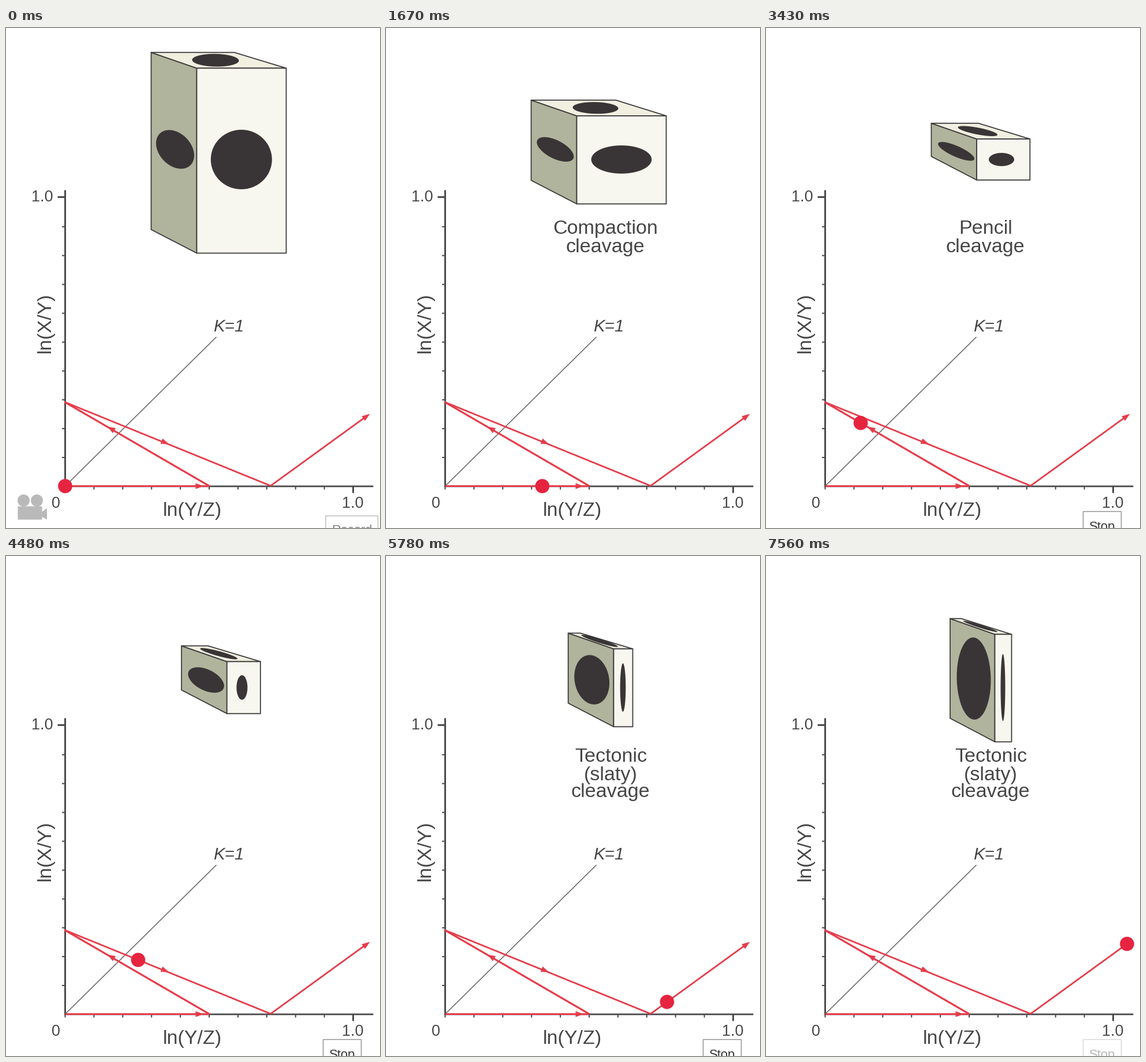
A matplotlib script for the animation above (7620 ms loop, 648 by 865 pixels).

```python
import numpy as np
import matplotlib.pyplot as plt
from matplotlib.animation import FuncAnimation
from matplotlib.collections import LineCollection
from matplotlib.patches import Circle, Polygon, Rectangle

W, H, DPI = 648, 865, 100
LOOP, STEP = 7620, 30
PT = 72 / DPI  # points per pixel

INK, TEXT, DARK = "#4a4a4c", "#464547", "#393536"
RED, DOT = "#e63c4a", "#e6243f"
FRONT, SIDE, TOP = "#f7f7ef", "#b1b49c", "#f0efe0"

plt.rcParams["font.family"] = "Liberation Sans"
plt.rcParams["path.snap"] = False
fig = plt.figure(figsize=(W / DPI, H / DPI), dpi=DPI, facecolor="white")
ax = fig.add_axes([0, 0, 1, 1])
# Whole coordinates are pixel centres
ax.set_xlim(-0.5, W - 0.5)
ax.set_ylim(H - 0.5, -0.5)
ax.axis("off")


def text(x, y, s, size, color=TEXT, **kw):
    opts = dict(ha="center", va="baseline", zorder=3)
    opts.update(kw)
    return ax.text(x, y, s, fontsize=size * PT, color=color, **opts)


def line(p, q, color, width, z):
    ax.plot(*zip(p, q), color=color, lw=width * PT, zorder=z,
            solid_capstyle="butt")


def arrow_head(tip, start, end, length=14, half=5):
    d = np.subtract(end, start) / np.hypot(*np.subtract(end, start))
    n = np.array([-d[1], d[0]])
    base = np.array(tip) - length * d
    ax.add_patch(Polygon([tip, base + half * n, base - half * n],
                         fc=RED, ec="none", zorder=5))


def shape(color, edge="none"):
    patch = Polygon(np.zeros((3, 2)), fc=color, ec=edge, lw=1.8 * PT,
                    joinstyle="round", zorder=2)
    return ax.add_patch(patch)


# Chart
ORIGIN_X, ORIGIN_Y, UNIT = 102, 792.4, 499
line((ORIGIN_X, 280), (ORIGIN_X, 794), INK, 3, 1)
line((101, ORIGIN_Y), (636, ORIGIN_Y), INK, 2.8, 1)
minor = [[(ORIGIN_X, 792), (ORIGIN_X, 798)]]
for i in range(1, 10):
    x, y = ORIGIN_X + UNIT * i / 10, ORIGIN_Y - UNIT * i / 10
    minor += [[(x, 792), (x, 798)], [(96.5, y), (102, y)]]
ax.add_collection(LineCollection(minor, colors=INK, linewidths=2 * PT, zorder=1))
line((89, 292), (102, 292), INK, 3, 1)
line((601, 792), (601, 804), INK, 3, 1)
line((102, 792), (364, 534), "#6a6a6c", 1.6, 1)

text(62, 300, "1.0", 27)
text(600.5, 830, "1.0", 27)
text(86, 830, "0", 27)
text(322.5, 844, "ln(Y/Z)", 34)
text(67.5, 510, "ln(X/Y)", 34, rotation=90, va="center")
text(385, 525, "K=1", 29.5, style="italic")

# Strain path
PATH = np.array([(102, 792), (352, 792), (101, 646.5), (458, 791.5), (625, 670.5)])
for a, b, tip, width in zip(PATH, PATH[1:],
                            [(342, 792), (175, 689), (282, 719.5), (630, 667)],
                            [3, 3.2, 2.8, 2.8]):
    line(a, b, RED, width, 4)
    arrow_head(tip, a, b)
dot = ax.add_patch(Circle(PATH[0], 12.3, fc=DOT, ec="none", zorder=6))

# Block geometry at each corner of the strain path
KEYS = {
    "left": (330, 330, 376, 393.5, 396),
    "right": (485, 485, 447.5, 427.4, 425),
    "top": (69, 191.5, 191.5, 165.3, 135),
    "bottom": (389, 262.5, 262.5, 289.5, 321),
    "back_left": (251, 251, 297.5, 314.5, 318.5),
    "back_right": (395, 399, 357, 336, 338),
    "front_x": (407.3, 407.5, 407.5, 410, 410),
    "front_rx": (53, 52, 12, 5, 4),
    "front_ry": (51.5, 11.2, 11.5, 38.6, 58),
    "top_x": (362.5, 362.5, 367.5, 369.5, 371),
    "top_a": (40.5, 39, 33.5, 33.5, 31),
    "top_b": (11, 9.7, 4.6, 3.6, 2.6),
    "top_tilt": (1, 1.5, 14, 17.5, 17.5),
    "side_x": (292.5, 293, 341, 355.5, 359.5),
    "side_y": (209.5, 209.5, 214, 214, 211.5),
    "side_rx": (33, 31.5, 31.5, 30.6, 29.5),
    "side_ry": (31.8, 10.2, 10, 36.5, 71),
    "side_shear": (0.32, 0.42, 0.4, 0.2, 0.1),
}
EDGE = "#3c3b3c"
side_face, top_face, front_face = (shape(c, EDGE) for c in (SIDE, TOP, FRONT))
side_spot, top_spot, front_spot = (shape(DARK) for _ in range(3))
ANGLE = np.linspace(0, 2 * np.pi, 90)
COS, SIN = np.cos(ANGLE), np.sin(ANGLE)


def draw_block(progress):
    g = {k: np.interp(progress, range(5), v) for k, v in KEYS.items()}
    l, r, t, b = g["left"], g["right"], g["top"], g["bottom"]
    bl, br, bt, bb = g["back_left"], g["back_right"], t - 27.2, b - 40.8
    side_face.set_xy([(bl, bt), (l, t), (l, b), (bl, bb)])
    top_face.set_xy([(bl, bt), (br, bt), (r, t), (l, t)])
    front_face.set_xy([(l, t), (r, t), (r, b), (l, b)])

    front_spot.set_xy(np.column_stack([g["front_x"] + g["front_rx"] * COS,
                                       227 + g["front_ry"] * SIN]))
    tilt = np.radians(g["top_tilt"])
    u, v = g["top_a"] * COS, g["top_b"] * SIN
    top_spot.set_xy(np.column_stack([
        g["top_x"] + u * np.cos(tilt) - v * np.sin(tilt),
        t - 13.7 + u * np.sin(tilt) + v * np.cos(tilt)]))
    u = g["side_rx"] * COS
    side_spot.set_xy(np.column_stack([
        g["side_x"] + u,
        g["side_y"] + g["side_shear"] * u + g["side_ry"] * SIN]))


# Captions: start, end, lines of (x, baseline, words)
CAPTIONS = [
    (1500, 2400, [(380, 356, "Compaction"), (379, 388, "cleavage")]),
    (3200, 4100, [(380, 356, "Pencil"), (379, 388, "cleavage")]),
    (5200, LOOP, [(389, 356, "Tectonic"), (389, 388, "(slaty)"),
                  (388.5, 416.5, "cleavage")]),
]
timed = [(start, end, text(x, y, s, 34.2))
         for start, end, rows in CAPTIONS for x, y, s in rows]

# Camera icon
GREY = "#b9b9b9"
camera = [Circle((30, 817), 10.5, fc=GREY, ec="none"),
          Circle((53, 817), 10.5, fc=GREY, ec="none"),
          Rectangle((20, 827), 42, 23, fc=GREY, ec="none"),
          Polygon([(60, 838), (70.5, 830), (70.5, 850), (60, 844)],
                  fc=GREY, ec="none")]
timed += [(0, 540, ax.add_patch(p)) for p in camera]


def tooltip(x, y, width, label, baseline):
    box = Rectangle((x, y), width, 60, fc="white", ec="#8c8c8c",
                    lw=1.4 * PT, zorder=7)
    return [ax.add_patch(box),
            text(x + width / 2, baseline, label, 22, "#333333", zorder=8)]


record = tooltip(553.5, 843.5, 90.5, "Record", 875)
stop = tooltip(549, 836, 66, "Stop", 869)
for artist in record:
    artist.set_alpha(0.6)
timed += [(0, 70, a) for a in record] + [(2400, LOOP, a) for a in stop]

# Progress along the path; whole numbers are its corners
TIMES = (470, 1010, 1670, 2235, 2720, 3430, 3850, 4480, 5560, 5780, 6380, 6760, 7000)
PROGRESS = (0, .308, .676, 1, 1.304, 1.748, 2, 2.354, 3, 3.174, 3.563, 3.844, 4)


def update(n):
    t = n * STEP + STEP / 2
    progress = np.interp(t, TIMES, PROGRESS) if t > 530 else 0
    dot.center = [np.interp(progress, range(5), PATH[:, i]) for i in (0, 1)]
    draw_block(progress)
    for start, end, artist in timed:
        artist.set_visible(start <= t < end)
    fade = 1 if t < 7490 else 0.7 if t < 7550 else 0.35
    for artist in stop:
        artist.set_alpha(fade)
    return []


anim = FuncAnimation(fig, update, frames=LOOP // STEP, interval=STEP,
                     repeat=True, repeat_delay=0, blit=False)
plt.show()
```
